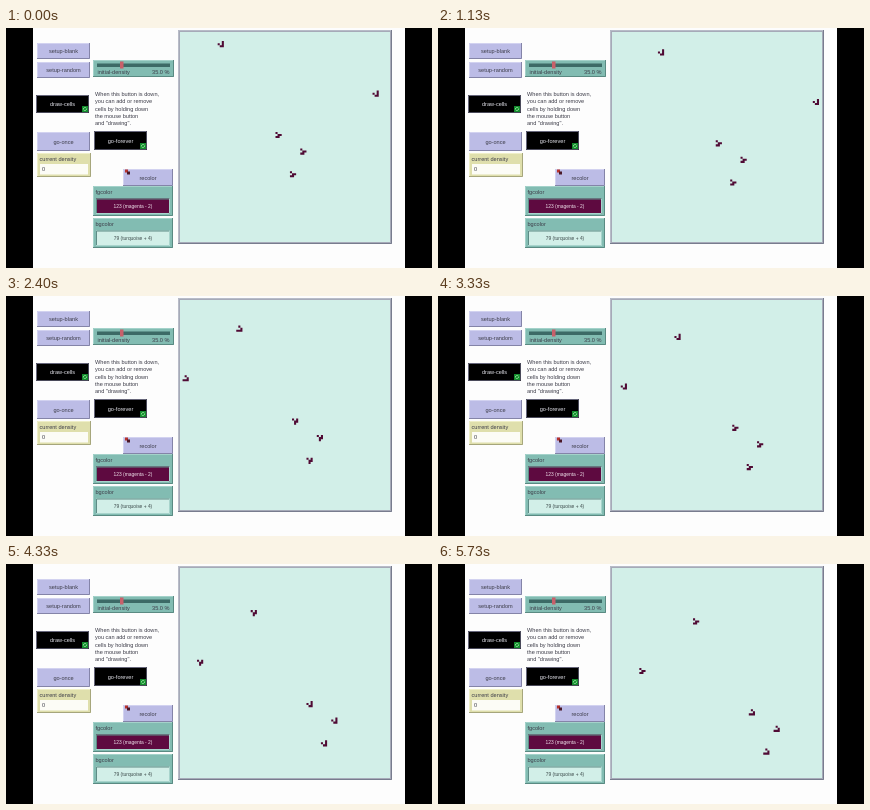
Recreate the animation shown at these times as an HTML page. Size 426 by 240 pixels, loop 5790 ms.

```html
<!DOCTYPE html>
<html lang="en">
<head>
<meta charset="utf-8">
<title>Gliders on a torus</title>
<style>
  html, body { margin: 0; width: 100%; height: 100%; overflow: hidden; background: #000; }
  svg { display: block; width: 100vw; height: 100vh; }
  text { font-family: "Liberation Sans", Arial, sans-serif; font-size: 5.6px; fill: #3c3c48; }
</style>
</head>
<body>
<svg id="stage" viewBox="0 0 426 240" xmlns="http://www.w3.org/2000/svg"></svg>
<script>
const NS = "http://www.w3.org/2000/svg";
const stage = document.getElementById("stage");

function add(tag, attrs, content) {
  const node = document.createElementNS(NS, tag);
  for (const key in attrs) node.setAttribute(key, attrs[key]);
  if (content) node.textContent = content;
  stage.appendChild(node);
  return node;
}

const path = (d, stroke, width = 1) =>
  add("path", { d, stroke, "stroke-width": width, fill: "none" });

const box = (x, y, x2, y2, fill) =>
  add("rect", { x, y, width: x2 - x, height: y2 - y, fill });

const label = (x, y, str, style = {}) => add("text", { x, y, ...style }, str);
const centred = { "text-anchor": "middle" };

// Filled box with a light top-left edge and a dark bottom-right edge
function panel(x, y, x2, y2, fill, light, dark) {
  box(x, y, x2, y2, fill);
  path(`M${x + .5} ${y2}V${y + .5}H${x2}`, light);
  path(`M${x} ${y2 - .5}H${x2 - .5}V${y}`, dark);
}

function button(x, y, x2, y2, name) {
  panel(x, y, x2, y2, "#bcbce6", "#d2d2f0", "#8484a8");
  label((x + x2) / 2, (y + y2) / 2 + 2.2, name, centred);
}

function pressed(x, y, x2, y2, name) {
  panel(x, y, x2, y2, "#000", "#66667a", "#4a4a5a");
  label((x + x2) / 2, (y + y2) / 2 + 2.2, name, { ...centred, style: "fill:#e6e6ee" });
  box(x2 - 7, y2 - 7, x2 - 1, y2 - 1, "#128a2c");
  path(`M${x2 - 5.7} ${y2 - 3.8}a1.8 1.8 0 0 1 3.2 -1M${x2 - 2.3} ${y2 - 4.2}a1.8 1.8 0 0 1 -3.2 1`, "#9cf0a4", .9);
}

const teal = (x, y, x2, y2) => panel(x, y, x2, y2, "#82bcb2", "#a4d2ca", "#5a8a82");

function colourInput(y, name, value, fill, ink) {
  teal(87, y, 167, y + 30);
  label(89.5, y + 8, name);
  panel(90, y + 12.5, 164, y + 28, fill, "#5e8c86", "#a8d4cc");
  label(127, y + 22.3, value, { ...centred, style: `font-size:4.9px;fill:${ink}` });
}

box(27, 0, 399, 240, "#fdfdfd");

button(31, 15, 84, 31, "setup-blank");
button(31, 34, 84, 50, "setup-random");
button(31, 104, 84, 123, "go-once");
button(117, 141, 167, 158, "recolor");
box(119, 141.5, 122, 144.5, "#b8322c");
box(121, 143.5, 124, 146.5, "#4a1828");

pressed(30, 67, 83, 85, "draw-cells");
pressed(88, 103, 141, 122, "go-forever");

teal(87, 32, 168, 49);
box(91, 35.5, 164, 39, "#3c6a66");
box(114, 33.5, 117.5, 40.5, "#c8606a");
label(91.5, 46.4, "initial-density");
label(163.5, 46.4, "35.0 %", { "text-anchor": "end" });

["When this button is down,", "you can add or remove", "cells by holding down",
 "the mouse button", "and \"drawing\"."]
  .forEach((line, i) => label(89, 68.2 + i * 7.2, line));

panel(31, 125, 85, 149, "#dfdfac", "#efefc8", "#a6a67c");
label(33.5, 133.2, "current density");
box(34, 136, 82, 146.5, "#fcfcf6");
label(36, 142.8, "0");

colourInput(158, "fgcolor", "123 (magenta - 2)", "#5e0a40", "#f0e4ec");
colourInput(190, "bgcolor", "79 (turquoise + 4)", "#d2efe8", "#3c4a4a");

// World view
const SIZE = 101, CELL = 2.065, LEFT = 174.5, TOP = 4.8;
panel(172, 2, 386, 216, "#a6aab8", "#b8bcc8", "#787c8e");
box(LEFT - .5, TOP - .8, 384, 214, "#d2efe8");
const life = add("path", { fill: "#500a34" });

// The four phases of a glider; each full cycle moves it one cell down and right
const PHASES = [
  [[1, 0], [2, 1], [0, 2], [1, 2], [2, 2]],
  [[0, 1], [2, 1], [1, 2], [2, 2], [1, 3]],
  [[2, 1], [0, 2], [2, 2], [1, 3], [2, 3]],
  [[1, 1], [2, 2], [3, 2], [1, 3], [2, 3]]
];
// column, row, starting phase
const GLIDERS = [[18, 3, 2], [93, 27, 2], [45, 47, 3], [57, 55, 3], [52, 66, 3]];

const LOOP = 5790;
const STALLS = [9, 27, 66, 78, 83]; // ticks that repeat the previous generation

function square(col, row) {
  const x = LEFT + (col % SIZE) * CELL, y = TOP + (row % SIZE) * CELL;
  return `M${x.toFixed(2)} ${y.toFixed(2)}h${CELL}v${CELL}h${-CELL}z`;
}

function draw(time) {
  const tick = Math.floor((time % LOOP + 5) * 15 / 1000);
  const generation = tick - STALLS.filter(s => s <= tick).length;
  let d = "";
  for (const [col, row, start] of GLIDERS) {
    const n = start + generation, shift = Math.floor(n / 4);
    for (const [x, y] of PHASES[n % 4]) d += square(col + x + shift, row + y + shift);
  }
  life.setAttribute("d", d);
}

const began = performance.now();
function loop() {
  draw(performance.now() - began);
  requestAnimationFrame(loop);
}
loop();
</script>
</body>
</html>
```
